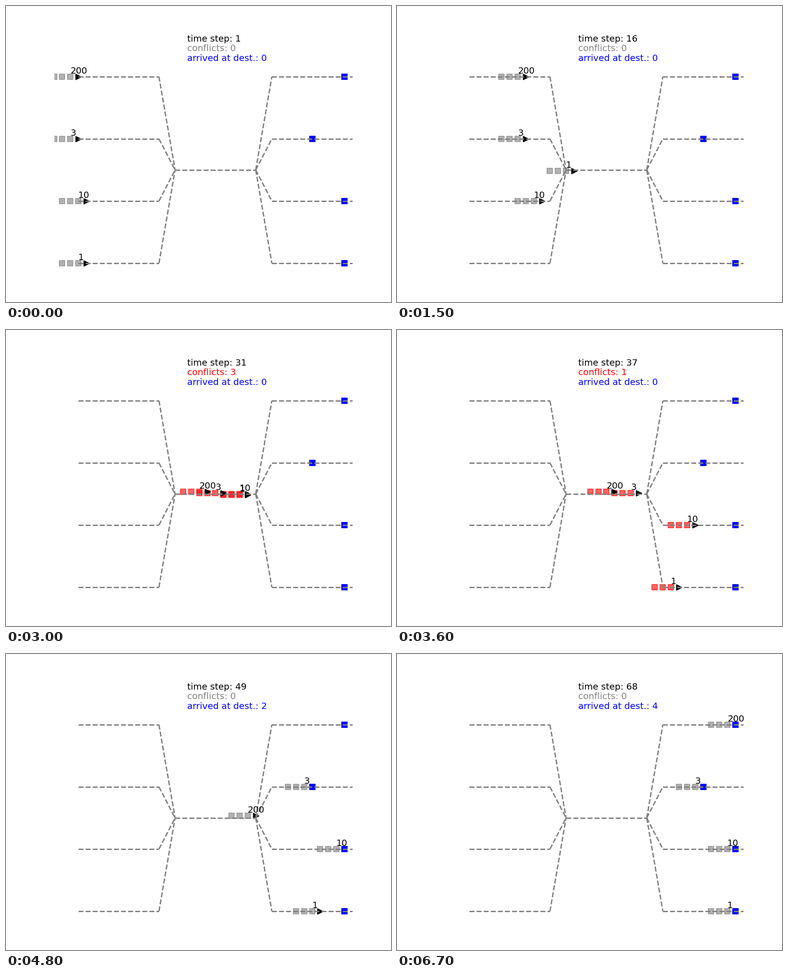
A matplotlib script for the animation above (6800 ms loop, 852 by 657 pixels).

```python
import numpy as np
import matplotlib.pyplot as plt
from matplotlib.animation import FuncAnimation

plt.rcParams["font.family"] = "DejaVu Sans"

STEPS = 68
MID_Y = 4.5

# Key points (time step, moves made) per train, from the bottom track upwards.
TRAINS = {
    "1": [(1, 1), (15.5, 11), (34, 21), (56, 29)],
    "10": [(1, 1), (24, 13), (37, 24), (50, 29)],
    "3": [(1, 0), (16, 7), (22, 11), (49, 25)],
    "200": [(1, 0), (16, 7), (22, 10.6), (43, 18.6), (56, 21), (68, 29)],
}
ROWS = 3 * np.arange(len(TRAINS))


def cell(moves):
    """Track cell after some moves; both switches are skipped in one move."""
    return moves + 2 * (moves > 10) + 2 * (moves > 20)


def on_shared(x):
    return 12 < x < 23


def head_pos(i, keys, step):
    x = cell(int(np.interp(step, *zip(*keys)) + 0.5))
    return x, (MID_Y + 0.05 * (i - 1) if on_shared(x) else ROWS[i])


def count_conflicts(heads):
    """Heads that stand within the train in front on the shared track."""
    xs = sorted(x for x, _ in heads if on_shared(x))
    return sum(b - a < 4 for a, b in zip(xs, xs[1:]))


fig = plt.figure(figsize=(6, 4.627), dpi=142, facecolor="white")
ax = fig.add_axes([0.125, 0.11, 0.775, 0.77])
ax.set_xlim(-3, 34)
ax.set_ylim(-0.3, 10.7)
ax.axis("off")


def track(x0, x1, y0, y1):
    ax.plot([x0, x1], [y0, y1], "--", color="gray")


track(12, 22, MID_Y, MID_Y)
for y in ROWS:
    track(0, 10, y, y)
    track(10, 12, y, MID_Y)
    track(22, 24, MID_Y, y)
    track(24, 34, y, y)

goals = np.array([cell(keys[-1][1]) for keys in TRAINS.values()])
wagons = ax.scatter([], [], marker="s", color="gray", alpha=0.6)
engines = ax.scatter([], [], marker=">", color="black")
ax.scatter(goals, ROWS, marker="s", color="blue")

labels = [ax.text(0, 0, name) for name in TRAINS]
clock, clashes, arrivals = (
    ax.text(13.5, 10.7 - 0.47 * i, "", color=c)
    for i, c in enumerate(("black", "gray", "blue")))


def update(frame):
    step = frame + 1
    heads = np.array([head_pos(i, keys, step)
                      for i, keys in enumerate(TRAINS.values())])
    done = heads[:, 0] == goals
    conflicts = count_conflicts(heads)
    color = "red" if conflicts else "gray"

    wagons.set_offsets([(x - k, y) for x, y in heads for k in (3, 2, 1)])
    wagons.set_color(color)
    engines.set_offsets(heads[~done])
    for label, (x, y) in zip(labels, heads):
        label.set_position((x - 1, y + 0.15))

    clock.set_text(f"time step: {step}")
    clashes.set_text(f"conflicts: {conflicts}")
    clashes.set_color(color)
    arrivals.set_text(f"arrived at dest.: {done.sum()}")
    return [wagons, engines, clock, clashes, arrivals, *labels]


anim = FuncAnimation(fig, update, frames=STEPS, init_func=lambda: update(0),
                     interval=100, repeat=True, repeat_delay=0)
plt.show()
```
